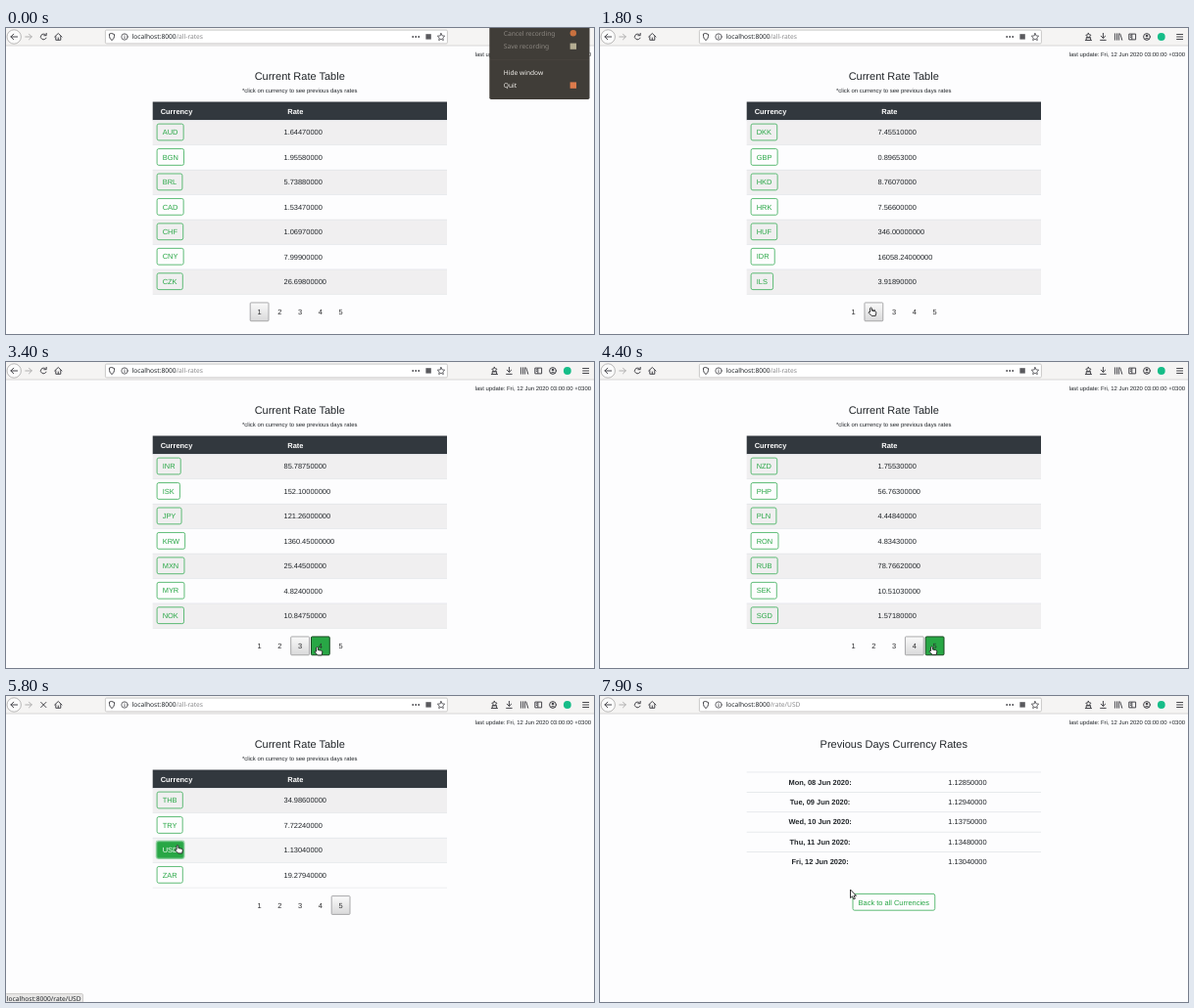
An HTML page that plays this animation: 600 by 313 pixels, repeating every 8000 ms.

```html
<!DOCTYPE html>
<html lang="en">
<head>
<meta charset="utf-8">
<title>Current Rate Table</title>
<style>
html, body { margin: 0; width: 100%; height: 100%; overflow: hidden; background: #fdfdfe; }
svg { display: block; width: 600px; height: 313px; }
text { font-family: "Liberation Sans", Arial, sans-serif; font-size: 7.45px; fill: #212529;
  text-rendering: geometricPrecision; white-space: pre; }
.ui { font-family: "Noto Sans", "Open Sans", sans-serif; font-size: 6.65px; }
.mid { text-anchor: middle; }
.end { text-anchor: end; }
.bold { font-weight: bold; }
.title { font-size: 11px; }
.small { font-size: 5.95px; }
.green { fill: #28a745; }
.line { fill: none; stroke: #45454a; stroke-width: 1; stroke-linecap: round; stroke-linejoin: round; }
</style>
</head>
<body>
<svg id="stage" viewBox="0 0 600 313">
  <defs>
    <linearGradient id="pressed" x2="0" y2="1">
      <stop stop-color="#fafafa"/><stop offset="1" stop-color="#d9d9da"/>
    </linearGradient>
  </defs>
  <g id="page"></g>
  <g id="bar"></g>
  <g id="top"></g>
</svg>
<script>
const LOOP = 8000, STEP = 100;
const ROW_TOP = 94, ROW_H = 25.45;

const pages = [
  'AUD 1.6447 BGN 1.9558 BRL 5.7388 CAD 1.5347 CHF 1.0697 CNY 7.999 CZK 26.698',
  'DKK 7.4551 GBP 0.89653 HKD 8.7607 HRK 7.566 HUF 346 IDR 16058.24 ILS 3.9189',
  'INR 85.7875 ISK 152.1 JPY 121.26 KRW 1360.45 MXN 25.445 MYR 4.824 NOK 10.8475',
  'NZD 1.7553 PHP 56.763 PLN 4.4484 RON 4.8343 RUB 78.7662 SEK 10.5103 SGD 1.5718',
  'THB 34.986 TRY 7.7224 USD 1.1304 ZAR 19.2794'
].map(s => s.match(/\S+ \S+/g).map(p => p.split(' ')));

const history = [
  ['Mon, 08', 1.1285], ['Tue, 09', 1.1294], ['Wed, 10', 1.1375],
  ['Thu, 11', 1.1348], ['Fri, 12', 1.1304]
];

// Start time of each table page
const pageStarts = [0, 1200, 2600, 3500, 4500];

// Pointer stops: time, x, y
const stops = [
  [200, 545, 45], [800, 276.5, 286], [1900, 276.5, 286], [2300, 297.5, 290],
  [2900, 297.5, 290], [3200, 317.5, 291.5], [3800, 317.5, 291.5], [4100, 338.5, 291],
  [4700, 338.5, 291], [5300, 175, 152.5], [7400, 175, 152.5], [7800, 255.5, 198]
];

const $ = id => document.getElementById(id);
const pen = document.createElement('canvas').getContext('2d');
pen.font = '16px "Liberation Sans", Arial, sans-serif';
const textWidth = s => pen.measureText(s).width * 7.45 / 16;

const text = (x, y, s, cls = '', extra = '') => `<text x="${x}" y="${y}" class="${cls}" ${extra}>${s}</text>`;
const rect = (x, y, w, h, fill, extra = '') =>
  `<rect x="${x}" y="${y}" width="${w}" height="${h}" fill="${fill}" ${extra}/>`;
const line = (d, extra = '') => `<path class="line" d="${d}" ${extra}/>`;
const inside = (p, x, y, w, h) => p && p.x >= x && p.x <= x + w && p.y >= y && p.y <= y + h;

function pointerAt(t) {
  if (t < stops[0][0]) return null;
  const i = stops.findIndex(s => s[0] > t);
  if (i < 0) { const [, x, y] = stops[stops.length - 1]; return { x, y }; }
  const [t0, x0, y0] = stops[i - 1], [t1, x1, y1] = stops[i];
  const u = (t - t0) / (t1 - t0), e = u * u * (3 - 2 * u);
  return { x: x0 + (x1 - x0) * e, y: y0 + (y1 - y0) * e };
}

function button(x, y, label, hot, focus) {
  const w = textWidth(label) + 12.1;
  const ring = focus ? rect(x - 1, y - 1, w + 2, 19.4, '#a5d9b2', 'rx="2.4"') : '';
  return ring + rect(x + .4, y + .4, w - .8, 16.8, hot ? '#28a745' : 'none',
    'rx="1.8" stroke="#4db568" stroke-width=".9"') +
    text(x + 6, y + 11.5, label, 'green', hot ? 'style="fill:#fff"' : '');
}

function pager(y, current, p) {
  let out = '', hand = false;
  for (let i = 0; i < 5; i++) {
    const cx = 258.6 + i * 20.75, x = cx - 9.8;
    const hot = inside(p, x, y, 19.6, 19.6);
    hand = hand || hot;
    if (i === current) out += rect(x + .4, y + .4, 18.8, 18.8, 'url(#pressed)', 'rx=".8" stroke="#a0a0a2" stroke-width=".9"');
    else if (hot) out += rect(x + .4, y + .4, 18.8, 18.8, '#28a745', 'rx="1" stroke="#17471f"');
    out += text(cx, y + 12.5, i + 1, 'mid', 'style="fill:#2c2c2e"');
  }
  return { out, hand };
}

function ratePage(t, p) {
  const current = pageStarts.filter(s => s <= t).length - 1;
  const rows = pages[current];
  let hand = false;
  let out = text(299.7, 53, 'Current Rate Table', 'mid title') +
    text(299.7, 65.7, '*click on currency to see previous days rates', 'mid small') +
    rect(149.7, 75.5, 300.3, 18.7, '#32383e') +
    text(157.7, 87.7, 'Currency', 'bold', 'style="fill:#fff"') +
    text(287.3, 87.7, 'Rate', 'bold', 'style="fill:#fff"');
  rows.forEach(([code, rate], i) => {
    const y = ROW_TOP + i * ROW_H;
    const over = inside(p, 150, y, 300, ROW_H);
    const hot = inside(p, 154, y + 3.6, textWidth(code) + 12.1, 17.6);
    hand = hand || hot;
    if (over || i % 2 === 0) out += rect(149.7, y, 300.3, ROW_H, over ? '#f4f4f5' : '#f0eff0');
    out += rect(149.7, y, 300.3, .6, '#dee2e6') +
      button(153.7, y + 3.7, code, hot, hot && t >= 5400) +
      text(283.5, y + 15.4, (+rate).toFixed(8));
  });
  const bottom = ROW_TOP + rows.length * ROW_H;
  out += rect(149.7, bottom, 300.3, .6, '#e2e4e7');
  const nav = pager(bottom + 8.4, current, p);
  return { out: out + nav.out, hand: hand || nav.hand };
}

function historyPage() {
  let out = text(299.8, 53, 'Previous Days Currency Rates', 'mid title');
  history.forEach(([day, rate], i) => {
    const y = 77.6 + i * 20.4;
    out += rect(149.7, y, 300.3, .7, '#dee2e6') +
      text(224.6, y + 13, day + ' Jun 2020:', 'mid bold') +
      text(375, y + 13, rate.toFixed(8), 'mid');
  });
  return { out: out + button(257.6, 202, 'Back to all Currencies'), hand: false };
}

function toolbar(loading, path) {
  const reload = loading
    ? line('M35.7 6.4l5.2 5.2M40.9 6.4l-5.2 5.2')
    : line('M41 10.2a2.9 2.9 0 1 1-.6-3.3M41.2 5.4v2.3h-2.4');
  return rect(0, 0, 600, 18, '#f5f4f3') + rect(0, 17.6, 600, .8, '#cfcdcc') +
    '<circle cx="8.2" cy="9" r="7.2" fill="#fbfbfb" stroke="#a9a8a8" stroke-width=".8"/>' +
    line('M11.6 9H5M7.7 6.2L4.9 9l2.8 2.8') +
    line('M19.8 9h6.4M23.5 6.2L26.3 9l-2.8 2.8', 'style="stroke:#b0afaf"') + reload +
    line('M49.6 9l3.7-3.5L57 9M50.8 8.6v3.7h5V8.6M53.3 12v-2') +
    rect(101.4, 2.1, 349, 13.8, '#fff', 'rx="1.2" stroke="#bdbbba" stroke-width=".8"') +
    line('M108 5.6l2.6.9c0 3-.7 5-2.6 6-1.9-1-2.6-3-2.6-6z', 'stroke-width=".8"') +
    '<circle class="line" cx="121" cy="9" r="3.2" style="stroke-width:.8"/>' +
    line('M121 8.7v2M121 7v.1', 'style="stroke-width:.8"') +
    text(128.6, 11.4, `localhost:8000<tspan fill="#8a8a8c">${path}</tspan>`, 'ui') +
    [415.2, 418.2, 421.2].map(x => `<circle cx="${x}" cy="9" r=".9" fill="#45454a"/>`).join('') +
    rect(428.4, 6.2, 5.4, 5.4, '#5a5a5e') +
    line('M444 5.5l1.1 2.4 2.6.3-1.9 1.8.5 2.6-2.3-1.3-2.3 1.3.5-2.6-1.9-1.8 2.6-.3z', 'style="stroke-width:.8"') +
    line('M495.3 12.5h6.2M496.2 12.2V9.8h4.4v2.4M498.4 5.3l.9 1.6 1.7.3-1.2 1.3.2 1.3h-3.2l.2-1.3-1.2-1.3 1.7-.3z') +
    line('M513.4 5.4v4.8M511.2 8.2l2.2 2.2 2.2-2.2M510.6 12.4h5.6') +
    line('M525.4 5.8v6.4M527.5 5.8v6.4M529.4 5.8v6.4M530.8 6l1.9 6.2') +
    line('M540.2 6.1h6.4v5.8h-6.4zM542.8 6.4v5.2M541.2 7.8h.6M541.2 9.4h.6') +
    '<circle class="line" cx="558" cy="9" r="3.4"/><circle cx="558" cy="8" r="1.3" fill="#45454a"/>' +
    line('M556 11.2q2-1.8 4 0') +
    '<circle cx="572.8" cy="9" r="3.9" fill="#16bd88"/>' +
    line('M588.6 6.5h6M588.6 9h6M588.6 11.5h6');
}

function recorderMenu() {
  const item = (y, label, off) => text(507.8, y, label, 'ui', `style="fill:${off ? '#8b8780' : '#f0eeea'}"`);
  return '<path d="M493.3 0h102.2v71.3q0 1.7-1.7 1.7h-98.8q-1.7 0-1.7-1.7z" fill="#403d38"/>' +
    rect(494, 32, 101, .6, '#4a4741') +
    item(8, 'Cancel recording', true) + item(21.3, 'Save recording', true) +
    item(48, 'Hide window') + item(61.4, 'Quit') +
    '<circle cx="578.8" cy="5.2" r="3.2" fill="#c9713f"/>' +
    rect(575.6, 15.6, 6.4, 6.2, '#b5ad92') + rect(575.6, 55.4, 6.4, 6.4, '#dc7b4c');
}

function statusBar(label, width) {
  return rect(-1, 304.6, width + 1, 9.4, '#e9e8e7', 'rx="1.2" stroke="#bcbab9" stroke-width=".7"') +
    text(.8, 311.7, label, 'ui');
}

function pointer(p, hand) {
  const d = hand
    ? 'M-.9 .6Q0-.5 .9 .6V3.1L4.2 3.7Q5.5 4 5.3 5.4L4.7 8.4H.7L-2.3 5.4Q-2.5 4.2-1.2 4.4L-.9 4.7Z'
    : 'M0 0V8.6L2 6.9 3.4 9.9 4.9 9.2 3.5 6.3H6Z';
  return `<path transform="translate(${p.x} ${p.y})" d="${d}" fill="#fff" stroke="#1d1d1f" stroke-width=".9" stroke-linejoin="round"/>`;
}

function draw(t) {
  const p = pointerAt(t);
  const view = t < 7400 ? ratePage(t, p) : historyPage();
  $('page').innerHTML = rect(0, 0, 600, 313, '#fdfdfe') +
    text(597, 28.8, 'last update: Fri, 12 Jun 2020 03:00:00 +0300', 'end small') + view.out;
  $('bar').innerHTML = toolbar(t >= 5600 && t < 7600, t < 6600 ? '/all-rates' : '/rate/USD');

  let top = '';
  if (t < 200) top += recorderMenu();
  if (t >= 5400 && t < 6700) top += statusBar('localhost:8000/rate/USD', 78.5);
  else if (t >= 6700 && t < 7600) top += statusBar('Read stackpath.bootstrapcdn.com', 148.5);
  if (p) top += pointer(p, view.hand);
  $('top').innerHTML = top;
}

const start = performance.now();
let shown = -1;
function tick() {
  const t = Math.floor(((performance.now() - start) % LOOP) / STEP) * STEP;
  if (t !== shown) draw(shown = t);
  requestAnimationFrame(tick);
}
tick();
</script>
</body>
</html>
```
